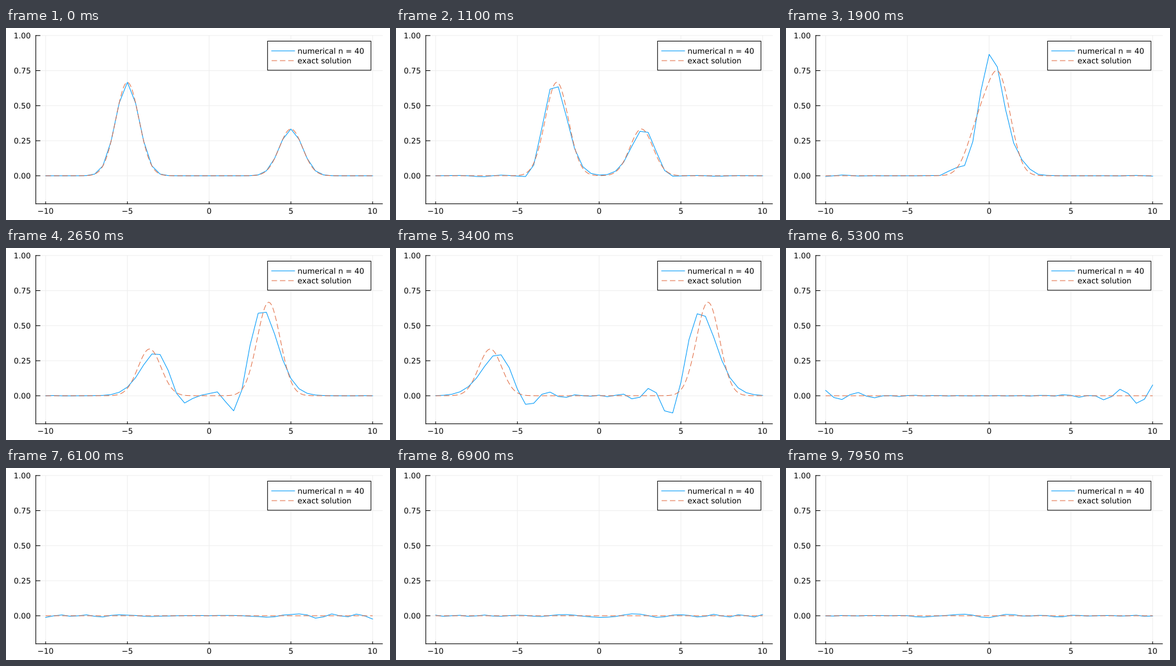
These frames come from a looping animation (600x300 px, 8 s). A matplotlib script:

```python
import numpy as np
import matplotlib.pyplot as plt
from matplotlib.animation import FuncAnimation
from matplotlib.patches import PathPatch, Rectangle
from matplotlib.textpath import TextPath
from matplotlib.transforms import Affine2D

W, H, DPI = 600, 300, 100
PX = 72 / DPI                      # one pixel in points
BLUE, ORANGE, GRID = "#009AFA", "#E26F46", "#efefef"
LEFT, RIGHT, TOP, BOTTOM = 46.6, 588.2, 11.8, 274.7

N = 40                             # grid cells on [-10, 10]
FRAMES, HOLD = 160, 10
STEPS = FRAMES - HOLD
DT = 40 / 199
SUB = 12


def px(x):
    return LEFT + (np.asarray(x) + 10.6) / 21.2 * (RIGHT - LEFT)


def py(y):
    return BOTTOM - (np.asarray(y) + 0.2) / 1.2 * (BOTTOM - TOP)


def pulse(x):
    return np.exp(-x ** 2)


def exact(x, t):
    return 2 / 3 * pulse(x + 5 - t) + 1 / 3 * pulse(x - 5 + t)


def exact_rate(x):
    a, b = x + 5, x - 5
    return 4 / 3 * a * pulse(a) - 2 / 3 * b * pulse(b)


def accel(u, v, h):
    """Second-order wave operator with non-reflecting ends."""
    a = np.empty_like(u)
    a[1:-1] = (u[2:] - 2 * u[1:-1] + u[:-2]) / h ** 2
    a[0] = 2 * (u[1] - u[0]) / h ** 2 - 2 * v[0] / h
    a[-1] = 2 * (u[-2] - u[-1]) / h ** 2 - 2 * v[-1] / h
    return a


def solve(x):
    h, dt = x[1] - x[0], DT / SUB
    rate = lambda s: np.array([s[1], accel(s[0], s[1], h)])
    s = np.array([exact(x, 0), exact_rate(x)])
    out = [s[0]]
    for _ in range(STEPS - 1):
        for _ in range(SUB):
            k1 = rate(s)
            k2 = rate(s + dt / 2 * k1)
            k3 = rate(s + dt / 2 * k2)
            k4 = rate(s + dt * k3)
            s = s + dt / 6 * (k1 + 2 * k2 + 2 * k3 + k4)
        out.append(s[0])
    return out


grid = np.linspace(-10, 10, N + 1)
fine = np.linspace(-10, 10, 401)
waves = solve(grid)

fig = plt.figure(figsize=(W / DPI, H / DPI), dpi=DPI, facecolor="white")
ax = fig.add_axes([0, 0, 1, 1])
ax.set_xlim(0, W)
ax.set_ylim(H, 0)
ax.axis("off")


def line(x, y, color, **kw):
    return ax.plot(x, y, color=color, lw=PX, snap=False, **kw)[0]


def label(x, y, text, ha):
    """Text as outlines, so that it can sit between whole pixels."""
    path = TextPath((0, 0), text, size=12, prop={"family": "DejaVu Sans"})
    box = path.get_extents()
    x -= {"left": 0, "center": (box.x0 + box.x1) / 2, "right": box.x1}[ha]
    place = Affine2D().scale(1, -1).translate(x, y)
    ax.add_patch(PathPatch(path, fc="black", lw=0, snap=False, zorder=6,
                           transform=place + ax.transData))


def curves(x1, y1, x2, y2, z):
    """The solid and the dashed curve in their shared styles."""
    solid = line(x1, y1, BLUE, zorder=z)
    dashed = line(x2, y2, ORANGE, zorder=z + 0.1,
                  dashes=(8.5, 4.5), dash_capstyle="butt")
    return solid, dashed


# Grid, ticks and tick labels
for x in (-10, -5, 0, 5, 10):
    line([px(x)] * 2, [TOP, BOTTOM], GRID, zorder=1)
    line([px(x)] * 2, [BOTTOM, BOTTOM - 3.2], "black", zorder=2)
    label(px(x), 290.2, str(x).replace("-", "\u2212"), "center")
for y in (0, 0.25, 0.5, 0.75, 1):
    line([LEFT, RIGHT], [py(y)] * 2, GRID, zorder=1)
    line([LEFT, LEFT + 6.5], [py(y)] * 2, "black", zorder=2)
    label(37.9, py(y) + 4.4, f"{y:.2f}", "right")
line([LEFT, RIGHT], [BOTTOM] * 2, "black", zorder=2)
line([LEFT] * 2, [TOP, BOTTOM], "black", zorder=2)

# Legend
ax.add_patch(Rectangle((408.7, 20.5), 161.5, 45.5, fc="white", ec="black",
                       lw=PX, snap=False, zorder=4))
curves([415, 451], [35.8] * 2, [415, 451], [51] * 2, 5)
label(455.5, 40.2, f"numerical n = {N}", "left")
label(455.5, 55.3, "exact solution", "left")

numeric, smooth = curves(px(grid), py(waves[0]), px(fine), py(exact(fine, 0)), 3)


def update(frame):
    step = max(0, frame - HOLD)
    numeric.set_ydata(py(waves[step]))
    smooth.set_ydata(py(exact(fine, step * DT)))
    return numeric, smooth


anim = FuncAnimation(fig, update, frames=FRAMES, interval=50, repeat=True,
                     repeat_delay=0, blit=False)
plt.show()
```
